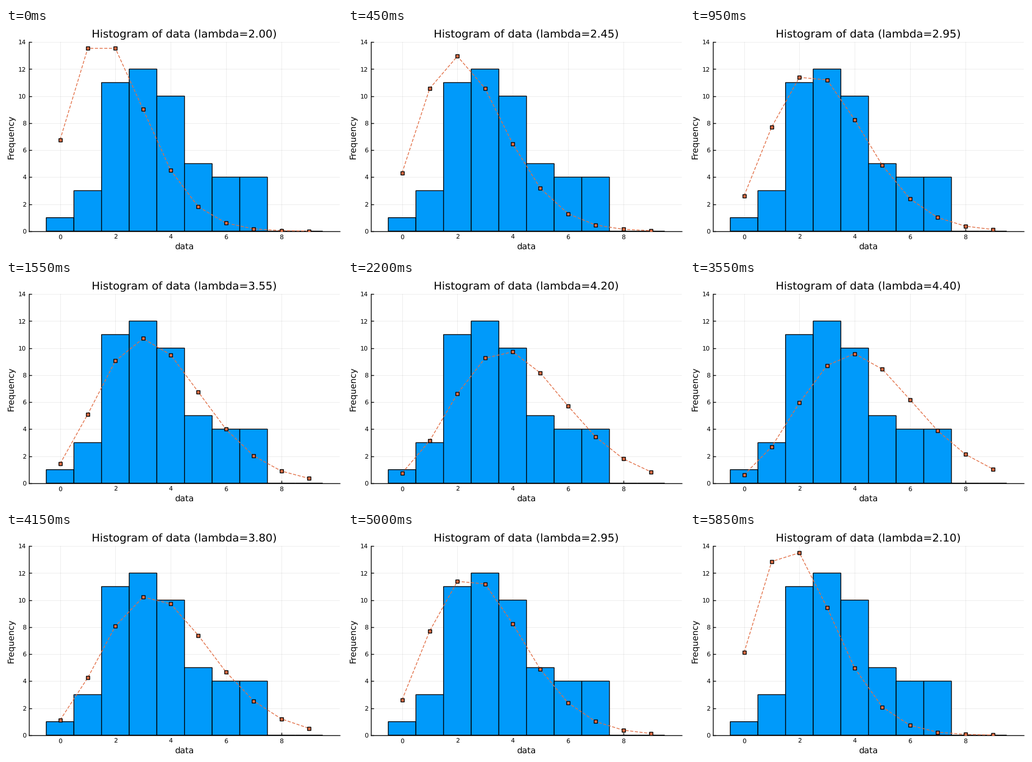
Recreate the animation shown at these times as a matplotlib script. Size 600x400 px, loop 5.9 s.

```python
import math

import matplotlib.pyplot as plt
import numpy as np
from matplotlib.animation import FuncAnimation

W, H, DPI = 600, 400, 100
LEFT, RIGHT, TOP, BOTTOM = 41.4, 596.1, 25.1, 362.8
BLUE, ORANGE = "#009AFA", "#E26F46"

plt.rcParams.update({
    "font.family": "DejaVu Sans",
    "text.hinting": "none",
    "axes.linewidth": 1,
})

counts = np.array([1, 3, 11, 12, 10, 5, 4, 4, 0, 0])
ks = np.arange(10)
factorials = np.array([math.factorial(k) for k in ks])

# lambda climbs to 5.00, then falls back starting from 4.90
lambdas = np.concatenate([2 + 0.05 * np.arange(61), 4.9 - 0.05 * np.arange(57)])


def expected(lam):
    return counts.sum() * np.exp(-lam) * lam**ks / factorials


def label(x, y, text, size, **kw):
    return fig.text(x / W, 1 - y / H, text, size=size, ha="center",
                    va="baseline", **kw)


fig = plt.figure(figsize=(W / DPI, H / DPI), dpi=DPI, facecolor="white")
ax = fig.add_axes([LEFT / W, 1 - BOTTOM / H, (RIGHT - LEFT) / W, (BOTTOM - TOP) / H])
half = 5 * 1.06**2
ax.set(xlim=(4.5 - half, 4.5 + half), ylim=(0, 14),
       xticks=range(0, 10, 2), yticks=range(0, 15, 2))
ax.set_axisbelow(True)
ax.grid(color="black", alpha=0.1, linewidth=0.5)
ax.tick_params(direction="in", length=3.6, width=1, pad=3.8, labelsize=8)
ax.spines[["top", "right"]].set_visible(False)
ax.spines[["left", "bottom"]].set_zorder(0.9)

ax.bar(ks, counts, width=1, color=BLUE, edgecolor="black", linewidth=1, snap=False)
curve, = ax.plot(ks, expected(2), color=ORANGE, linewidth=1, linestyle=(0, (4, 2)),
                 marker="s", markersize=4.3, markeredgecolor="black",
                 markeredgewidth=1)

mid_x, mid_y = (LEFT + RIGHT) / 2, (TOP + BOTTOM) / 2
title = label(mid_x, 17, "", 14)
label(mid_x, 395, "data", 11)
label_y = fig.text(14 / W, 1 - (mid_y + 1) / H, "Frequency", size=11, rotation=90,
                   rotation_mode="anchor", ha="center", va="baseline")


def update(i):
    lam = lambdas[i]
    curve.set_ydata(expected(lam))
    title.set_text(f"Histogram of data (lambda={lam:.2f})")
    return curve, title


anim = FuncAnimation(fig, update, frames=len(lambdas), interval=50,
                     repeat=True, repeat_delay=0)
plt.show()
```
